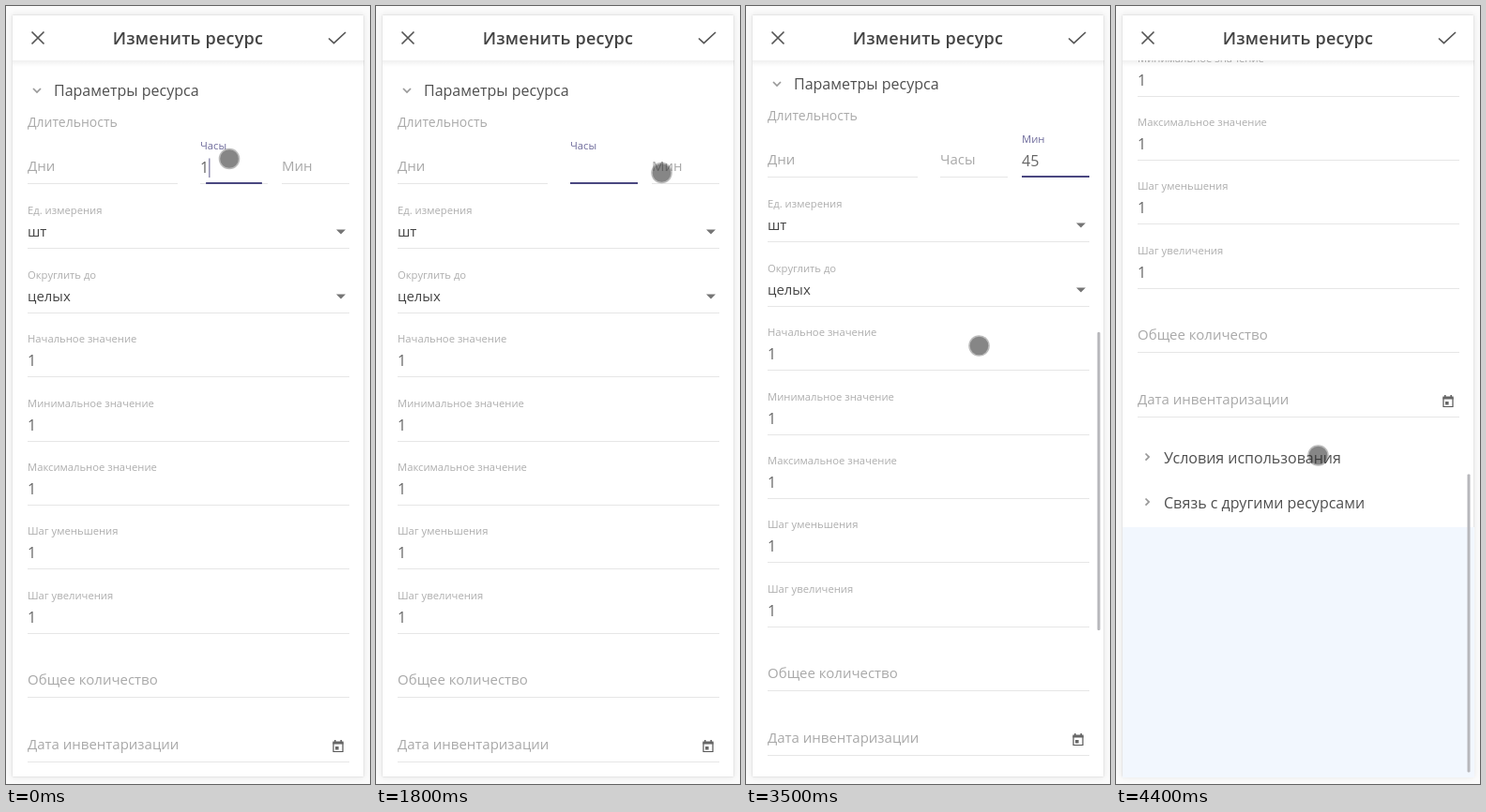
Recreate the animation shown at these times as an HTML page. Size 388x830 px, loop 4.5 s.

```html
<!DOCTYPE html>
<html lang="ru">
<head>
<meta charset="utf-8">
<title>Изменить ресурс</title>
<style>
html, body { margin: 0; height: 100%; overflow: hidden; background: #fbfbfb; }
svg { display: block; width: 388px; height: 830px; font-family: "Open Sans", "Noto Sans", sans-serif; }
.card { fill: #fff; stroke: #e6e6e6; filter: drop-shadow(0 0 3px rgba(0,0,0,.08)); }
.title { font-size: 18px; font-weight: 600; letter-spacing: .0125em; text-anchor: middle; fill: #444; }
.section { font-size: 16px; fill: #505050; }
.caption { font-size: 14px; fill: #aaa; }
.small { font-size: 11.25px; fill: #aeaeae; }
.hint { font-size: 15px; fill: #a9a9a9; }
.value { font-size: 15px; fill: #444; }
.num { font-size: 16px; fill: #666; }
.rule { stroke: #e6e6e6; }
.focus { stroke: #4a4780; stroke-width: 2; }
.caret { stroke: #8a88ac; stroke-width: 1.4; }
.icon { fill: none; stroke: #555; stroke-width: 1.7; }
.chevron { fill: none; stroke: #999; stroke-width: 1.7; }
</style>
</head>
<body>
<svg viewBox="0 0 388 830">
  <defs>
    <clipPath id="view"><rect x="7" y="58" width="375" height="765"/></clipPath>
    <linearGradient id="shade" x2="0" y2="1">
      <stop stop-color="#000" stop-opacity=".06"/>
      <stop offset="1" stop-color="#000" stop-opacity="0"/>
    </linearGradient>
  </defs>
  <rect class="card" x="6.5" y="9.5" width="375" height="813" rx="1"/>
  <g clip-path="url(#view)">
    <g id="page">
      <rect x="7" y="924" width="375" height="600" fill="#f2f7fe"/>
    </g>
    <rect id="thumb" x="374.5" width="3" height="318" rx="1" fill="#b7b7bb"/>
  </g>
  <rect x="7" y="58" width="375" height="7" fill="url(#shade)"/>
  <text class="title" x="194" y="41">Изменить ресурс</text>
  <path class="icon" d="M27.5 27.5l13 13m0-13l-13 13M344 34.5l5.5 5.2 12.5-11.7"/>
  <g id="pointer">
    <circle r="11.3" fill="rgba(60,60,60,.34)"/>
    <circle r="9.8" fill="rgba(40,40,40,.36)"/>
  </g>
</svg>
<script>
const LOOP = 4500, STEP = 100;
const $ = id => document.getElementById(id);
const page = $('page');

function add(tag, attrs, text = '') {
  const el = document.createElementNS('http://www.w3.org/2000/svg', tag);
  for (const k in attrs) el.setAttribute(k, attrs[k]);
  el.textContent = text;
  return page.appendChild(el);
}
const label = (cls, x, y, text) => add('text', { class: cls, x, y }, text);
const rule = (x1, x2, y, cls = 'rule') => add('line', { class: cls, x1, x2, y1: y, y2: y });
const path = (d, cls, fill = 'none') => add('path', { d, class: cls, fill });
const show = (el, on) => { el.style.display = on ? '' : 'none'; };

// Static form
path('M29 88l4 4 4-4', 'chevron');
label('section', 51, 96, 'Параметры ресурса');
label('caption', 23, 129, 'Длительность');
rule(23, 183, 189.5);
label('hint', 23, 176, 'Дни');

const fields = [
  ['Ед. измерения', 'шт'], ['Округлить до', 'целых'],
  ['Начальное значение', 1], ['Минимальное значение', 1], ['Максимальное значение', 1],
  ['Шаг уменьшения', 1], ['Шаг увеличения', 1],
  ['Общее количество'], ['Дата инвентаризации']
];
fields.forEach(([name, value], i) => {
  const y = Math.round(258.4 + i * 68.4) + .5;
  rule(23, 366, y);
  if (!value) return label('hint', 23, y - 13.5, name);
  label('small', 23, y - 37, name);
  if (value === 1) return label('num', 23, y - 11.3, value);
  label('value', 23, y - 13, value);
  path(`M352 ${y - 20}h10l-5 5z`, '', '#757575');
});
path('M349 786h10v9.5h-10z', 'icon').style.strokeWidth = 1.2;
path('M348.4 784.5h11.2v3h-11.2zM350 783h1.6v2H350zM356.4 783h1.6v2h-1.6zM351 790h3.6v3.4H351z', '', '#666');
['Условия использования', 'Связь с другими ресурсами'].forEach((s, i) => {
  const y = 850 + i * 48;
  path(`M31.5 ${y - 4.5}l3.6 3.6-3.6 3.6`, 'chevron');
  label('section', 51, y + 5.5, s);
});

// Focusable time inputs
function input(x, name) {
  rule(x, x + 72, 189.5);
  return {
    x,
    label: add('text', { class: 'hint' }, name),
    text: label('num', x, 177.5, ''),
    line: rule(x, x + 72, 189, 'focus'),
    caret: add('line', { class: 'caret', y1: 162.5, y2: 183 })
  };
}
const hours = input(207, 'Часы'), mins = input(294, 'Мин');

function setInput(f, lift, grow, text, caretOn) {
  f.label.setAttribute('transform', `translate(${f.x} ${176 - 23 * lift}) scale(${1 - lift / 4})`);
  f.label.style.fill = grow ? '#6f6c9c' : '';
  f.line.setAttribute('x1', f.x + 36 - 36 * grow);
  f.line.setAttribute('x2', f.x + 36 + 36 * grow);
  show(f.line, grow);
  f.text.textContent = text;
  const cx = f.x + .7 + text.length * 9.1;
  f.caret.setAttribute('x1', cx);
  f.caret.setAttribute('x2', cx);
  show(f.caret, caretOn);
}

// Piecewise interpolation over [time, value] points
function track(t, pts, ease = u => u) {
  if (t <= pts[0][0]) return pts[0][1];
  for (let i = 1; i < pts.length; i++) {
    const [a, p] = pts[i - 1], [b, q] = pts[i];
    if (t < b) return p + (q - p) * ease((t - a) / (b - a));
  }
  return pts[pts.length - 1][1];
}
const smooth = u => u * u * (3 - 2 * u);

const scrollPts = [[3400, 0], [3500, 7], [3600, 105], [3700, 307], [3800, 350], [3900, 366], [4000, 368]];
const pointerX = [[1400, 238], [1800, 304.5], [3000, 304.5], [3500, 248.5], [3700, 246.5], [4000, 246.5], [4400, 215.5]];
const pointerY = [[1400, 163], [1800, 178], [3000, 178], [3500, 362.5], [3700, 374.5], [4000, 374.5], [4400, 479.5]];

function draw(t) {
  const scroll = track(t, scrollPts);
  page.setAttribute('transform', `translate(0 ${-scroll})`);
  $('thumb').setAttribute('y', 345 + scroll * .42);
  show($('thumb'), scroll > 0);

  const onMins = t >= 2000;
  const swap = track(t, [[1950, 0], [2200, 1]], smooth);
  setInput(hours, 1 - swap, onMins ? 0 : track(t, [[0, .83], [100, 1]]),
    t < 1000 ? '1' : '', t < 500 || t >= 900 && t < 1500);
  setInput(mins, swap, onMins ? swap : 0,
    t < 2600 ? '' : t < 2700 ? '4' : '45', onMins && t < 2400);

  $('pointer').setAttribute('transform',
    `translate(${track(t, pointerX, smooth)} ${track(t, pointerY, smooth)})`);
}

const start = performance.now();
function tick() {
  const t = (performance.now() - start) % LOOP;
  draw(Math.floor(t / STEP) * STEP);
  requestAnimationFrame(tick);
}
tick();
</script>
</body>
</html>
```
